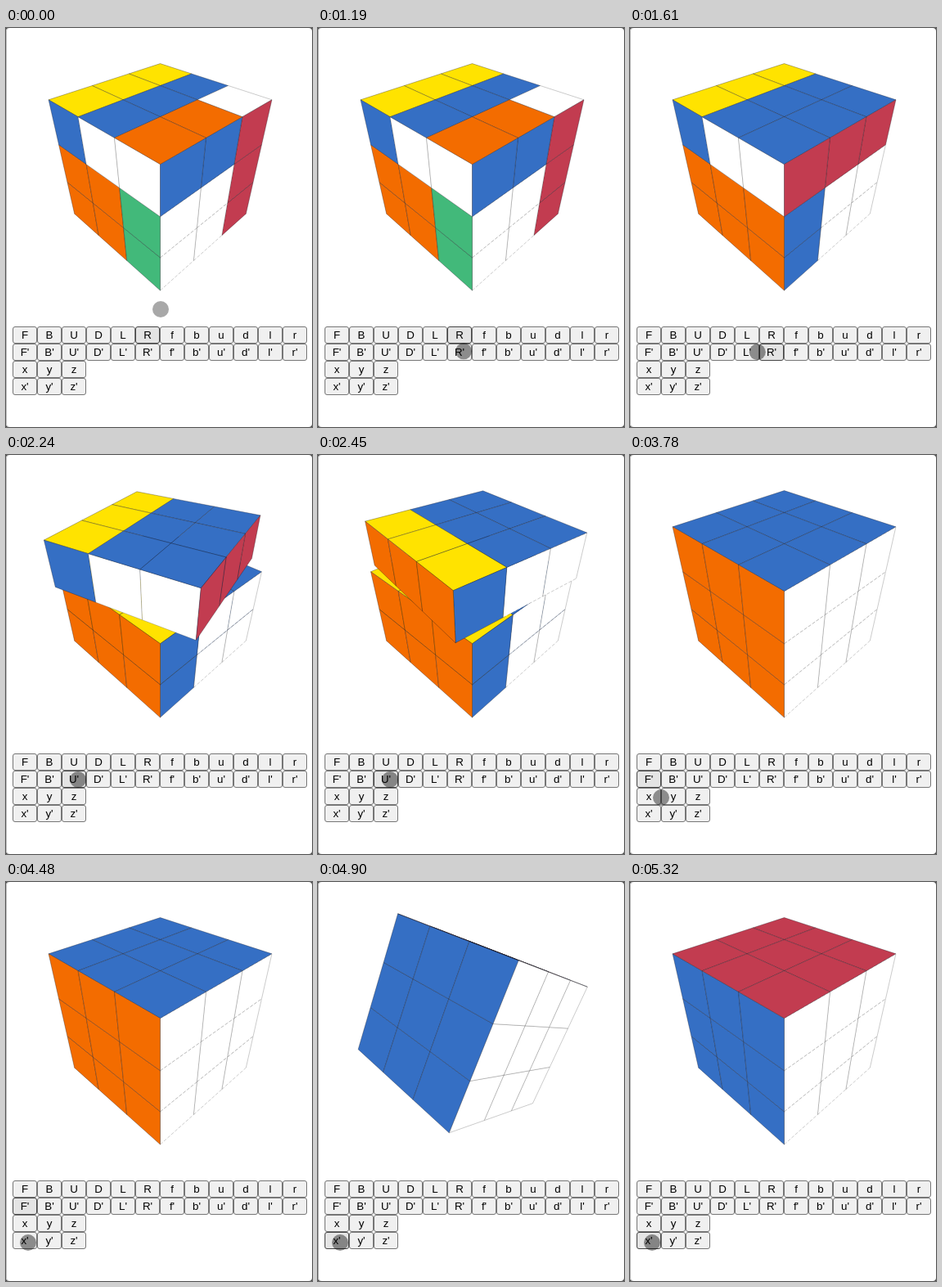
Animation, 374 px wide and 488 px high, one loop 5.39 s. Source, as an HTML page with a canvas:

```html
<!DOCTYPE html>
<html lang="en">
<head>
<meta charset="utf-8">
<title>Cube</title>
<style>
  html, body { margin: 0; width: 100%; height: 100%; overflow: hidden; background: #444; }
  #stage { position: relative; width: 374px; height: 488px; overflow: hidden; background: #fff;
    border-radius: 4px; box-shadow: inset 1px 0 #bbb; }
  canvas { position: absolute; left: 0; top: 0; }
  .key { position: absolute; box-sizing: border-box; width: 30px; height: 21px; border: 1px solid #767676;
    border-radius: 3px; background: #f0f0f0; color: #000; text-align: center;
    font: 13.33px/19px "Liberation Sans", Arial, sans-serif; }
  .key.focus { background: #e4e4e4; border-color: #444; }
  #pointer { position: absolute; left: -10px; top: -10px; width: 20px; height: 20px; border-radius: 50%; background: #000; }
</style>
</head>
<body>
<div id="stage"><canvas id="cube" width="374" height="362"></canvas></div>
<script>
const LOOP = 5390, TURN = 280;
const stage = document.getElementById('stage');
const ctx = document.getElementById('cube').getContext('2d');

// Keypad
const keys = {};
["F B U D L R f b u d l r", "F' B' U' D' L' R' f' b' u' d' l' r'", "x y z", "x' y' z'"].forEach((row, r) =>
  row.split(' ').forEach((label, i) => {
    const key = document.createElement('div');
    key.className = 'key';
    key.textContent = label;
    key.style.left = 8 + 30 * i + 'px';
    key.style.top = 365 + 21 * r + 'px';
    keys[label] = stage.appendChild(key);
  }));
const pointer = document.createElement('div');
pointer.id = 'pointer';
stage.appendChild(pointer);

// Turns: the first three scramble the cube before the loop begins
const turn = (key, axis, dir, start, whole = false) => ({ key, axis, dir, start, whole });
const turns = [
  turn('F', 2, -1, -3000), turn('U', 1, -1, -2000), turn('R', 0, -1, -1000),
  turn("R'", 0, 1, 1260), turn("U'", 1, 1, 2193), turn("F'", 2, 1, 3221), turn("x'", 0, 1, 4713, true)
];

// Every cubie carries all six colours, so inner sides show during a turn
const colors = [['#ffe300', '#fff'], ['#42b97a', '#356fc4'], ['#c23c50', '#f36c00']];
const faces = [];
for (let i = 0; i < 27; i++)
  for (let axis = 0; axis < 3; axis++)
    for (const side of [-1, 1]) {
      const normal = [0, 0, 0];
      normal[axis] = side;
      faces.push({
        center: [i % 3 - 1, Math.floor(i / 3) % 3 - 1, Math.floor(i / 9) - 1],
        normal, color: colors[axis][(side + 1) / 2]
      });
    }

const clamp = v => Math.min(1, Math.max(0, v));
const dot = (a, b) => a[0] * b[0] + a[1] * b[1] + a[2] * b[2];

function rotate(p, axis, angle) {
  const i = (axis + 1) % 3, j = (axis + 2) % 3, c = Math.cos(angle), s = Math.sin(angle);
  const q = [...p];
  q[i] = p[i] * c - p[j] * s;
  q[j] = p[i] * s + p[j] * c;
  return q;
}

// Camera at (4, 4, 4), aimed slightly below the centre
const CAMERA = [4, 4, 4];
const pitch = Math.atan2(4.3, Math.hypot(4, 4)), sinP = Math.sin(pitch), cosP = Math.cos(pitch);
function project([x, y, z]) {
  const right = (x - z) * Math.SQRT1_2, near = (x + z) * Math.SQRT1_2;
  const scale = 387 / (6.924 - y * sinP - near * cosP);
  return [188.5 + right * scale, 180 - (y * cosP - near * sinP + 0.239) * scale];
}

function placeFace(face, t) {
  let { center, normal } = face, slab = 0, open = false;
  for (const { axis, dir, start, whole } of turns) {
    const progress = clamp((t - start) / TURN);
    if (!progress) break;
    if (progress < 1) {
      slab = Math.round(center[axis]);
      open = Math.abs(normal[axis]) > 0.5 && !whole;
    }
    if (whole || Math.round(center[axis]) === 1) {
      const angle = dir * progress * Math.PI / 2;
      center = rotate(center, axis, angle);
      normal = rotate(normal, axis, angle);
    }
  }
  const outer = dot(face.center, face.normal) > 0.5;
  const middle = center.map((v, i) => v + normal[i] / 2);
  const visible = (outer || open) && dot(normal, CAMERA.map((v, i) => v - middle[i])) > 0;
  return { face, t, center, middle, normal, slab, visible, distance: Math.hypot(...center.map(v => v - 4)) };
}

// Side vectors follow the same turns as the normal
function corners({ face, t, middle }) {
  const n = face.normal;
  let u = [n[1], n[2], n[0]], v = [n[2], n[0], n[1]], c = face.center;
  for (const { axis, dir, start, whole } of turns) {
    const angle = dir * clamp((t - start) / TURN) * Math.PI / 2;
    if (!angle) break;
    if (whole || Math.round(c[axis]) === 1) [u, v, c] = [u, v, c].map(p => rotate(p, axis, angle));
  }
  return [[-1, -1], [1, -1], [1, 1], [-1, 1]].map(([a, b]) => middle.map((m, i) => m + (a * u[i] + b * v[i]) / 2));
}

function drawFace(placed) {
  const points = corners(placed), flat = points.map(project), white = placed.face.color === '#fff';
  ctx.beginPath();
  flat.forEach(p => ctx.lineTo(...p));
  ctx.closePath();
  ctx.fillStyle = placed.face.color;
  ctx.fill();
  ctx.strokeStyle = white ? 'rgba(40,40,40,.3)' : 'rgba(20,20,30,.4)';
  flat.forEach((p, i) => {
    const k = (i + 1) % 4;
    const dashed = white && placed.normal[0] > 0.99 && Math.abs(points[i][1] - points[k][1]) < 0.01;
    const [from, to] = p[0] < flat[k][0] ? [p, flat[k]] : [flat[k], p];
    ctx.setLineDash(dashed ? [4, 2] : []);
    ctx.beginPath();
    ctx.moveTo(...from);
    ctx.lineTo(...to);
    ctx.stroke();
  });
}

// Pointer path: time, x, y
const path = [[0, 189, 344], [350, 189, 344], [1050, 178, 395], [1400, 178, 396], [2050, 88, 397], [2450, 88, 397],
  [3050, 23, 400], [3560, 23, 400], [3780, 38, 419], [4130, 27, 440], [4300, 27, 441], [LOOP, 27, 441]];

function movePointer(t) {
  const i = path.findIndex(p => p[0] > t), [t0, x0, y0] = path[i - 1], [t1, x1, y1] = path[i];
  const k = (t - t0) / (t1 - t0), e = k * k * (3 - 2 * k);
  const x = x0 + (x1 - x0) * e, y = y0 + (y1 - y0) * e;
  pointer.style.transform = `translate(${x}px, ${y}px)`;
  pointer.style.opacity = 0.34 + 0.08 * clamp((y - 350) / 20);
}

function frame() {
  const t = performance.now() % LOOP;
  ctx.clearRect(0, 0, 374, 362);
  ctx.lineWidth = 0.8;
  ctx.lineJoin = 'round';
  faces.map(face => placeFace(face, t))
    .filter(f => f.visible)
    .sort((a, b) => a.slab - b.slab || b.distance - a.distance)
    .forEach(drawFace);
  const focused = turns.filter(m => m.start <= t).pop().key;
  for (const label in keys) keys[label].classList.toggle('focus', label === focused);
  movePointer(t);
  requestAnimationFrame(frame);
}
frame();
</script>
</body>
</html>
```
